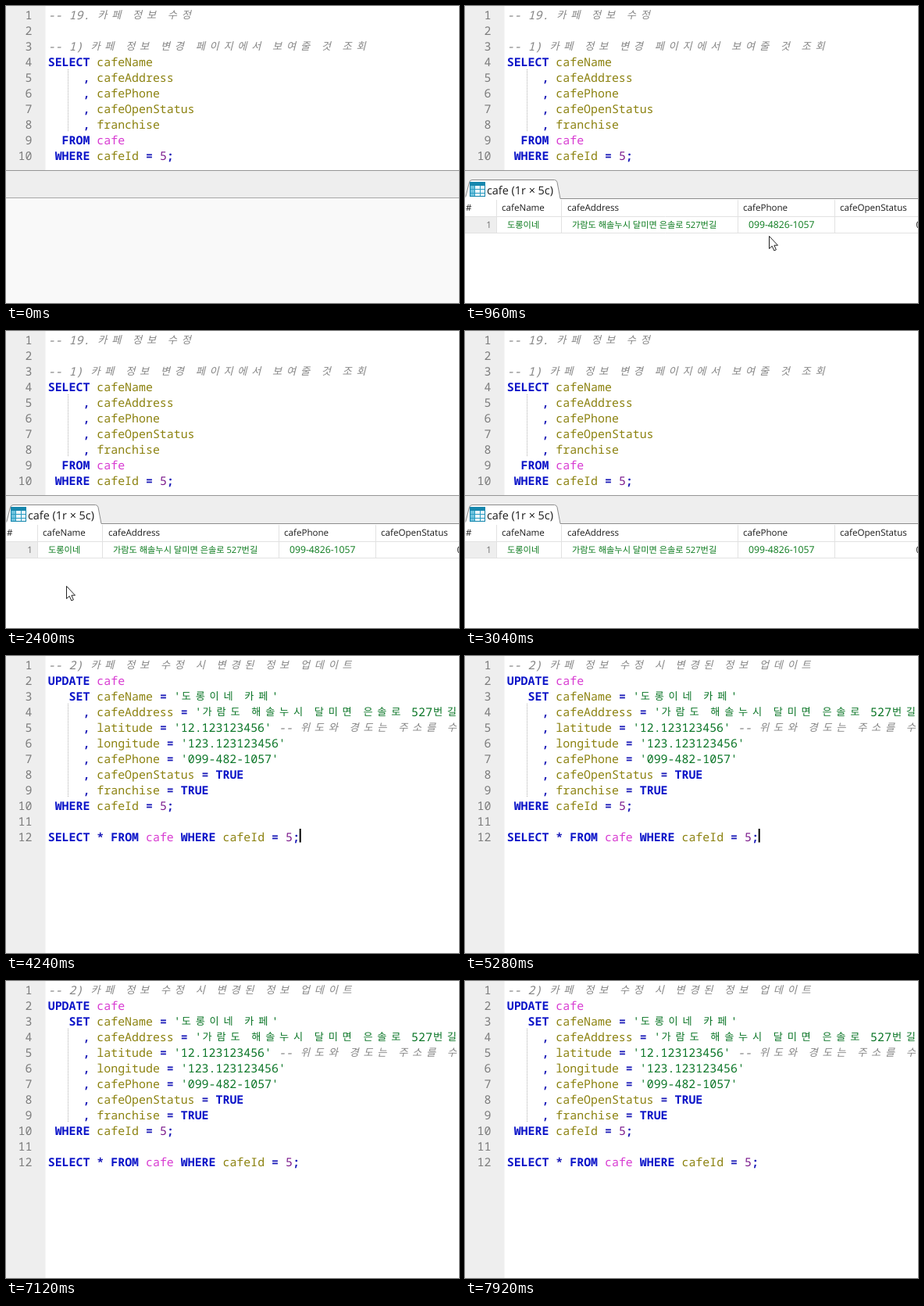
These frames come from a looping animation (580 px wide and 380 px high, 8000 ms). An HTML page:

```html
<!DOCTYPE html>
<html lang="ko">
<head>
<meta charset="utf-8">
<title>SQL editor</title>
<style>
  html, body { margin: 0; width: 100%; height: 100%; overflow: hidden; background: #fff; }
  svg { display: block; width: 580px; height: 380px; text-rendering: geometricPrecision; }

  .code text { font: 14.92px "Noto Sans Mono", "DejaVu Sans Mono", monospace; }
  .code text.ko { font: 300 13.2px "Noto Sans CJK KR", "Noto Sans CJK", sans-serif; }
  .code text.comment { fill: #858585; font-style: italic; }
  .code text.keyword { fill: #0c14c8; font-weight: 700; }
  .code .string { fill: #0a7526; }
  .code .number { fill: #7c1a8c; }
  .code .table { fill: #d83cd2; }
  .code .name { fill: #8c8210; }
  .code text.symbol { fill: #1a1ab8; font-weight: 600; }
  .code .line { fill: #7c7c7c; text-anchor: end; }
  .guide { stroke: #b0b0b0; stroke-dasharray: 1 1; }

  .ui text { font: 11.6px "Open Sans", "Noto Sans CJK KR", "Noto Sans CJK", sans-serif; fill: #1c1c1c; }
  .ui text.tab { font-size: 14.4px; }
  .ui text.cell { fill: #0a7a1c; font-size: 12.2px; }
  .ui text.ko { font-size: 11.2px; }
  .ui text.row { fill: #707070; text-anchor: end; }

  .query, .update, .idle, .result, .caret { animation: 8s step-end infinite; }
  .query { animation-name: query; }
  .update { animation-name: update; }
  .idle { animation-name: idle; }
  .result { animation-name: result; }
  .caret { animation-name: caret; }
  .show { animation: show 8s step-end infinite; }
  .pointer { animation: move 8s ease-in-out infinite; }

  @keyframes query { 0% { opacity: 1 } 49%, 100% { opacity: 0 } }
  @keyframes update { 0% { opacity: 0 } 49%, 100% { opacity: 1 } }
  @keyframes idle { 0% { opacity: 1 } 6%, 100% { opacity: 0 } }
  @keyframes result { 0% { opacity: 0 } 6%, 100% { opacity: 1 } }
  /* 530 ms on, 530 ms off */
  @keyframes caret {
    0%, 56%, 69.25%, 82.5%, 95.75%, 100% { opacity: 0 }
    49.375%, 62.625%, 75.875%, 89.125% { opacity: 1 }
  }
  @keyframes show { 0%, 34.5%, 100% { opacity: 0 } 10% { opacity: 1 } }
  @keyframes move {
    0%, 10% { transform: translate(387px, 273px) }
    12%, 13% { transform: translate(389px, 294px) }
    21.5%, 30.5% { transform: translate(77px, 326px) }
    34.5%, 100% { transform: translate(104px, 246px) }
  }
</style>
</head>
<body>
<svg viewBox="0 0 580 380">
  <rect width="580" height="380" fill="#fff"/>

  <g class="query">
    <rect width="50.5" height="210" fill="#eee"/>
    <path class="guide" d="M79.5 81V160"/>
    <g class="code" id="query"></g>

    <g class="idle">
      <rect y="211" width="580" height="34" fill="#eee"/>
      <rect y="245" width="580" height="1" fill="#a8a8a8"/>
      <rect y="246" width="580" height="134" fill="#f9f9f9"/>
    </g>

    <g class="result ui">
      <rect y="211" width="580" height="35" fill="#eee"/>
      <path d="M0 246.5L1 244.5L6 225.5Q6.5 222.5 9 222.5H114.5Q117 222.5 118 225.5L122 246.5Z" fill="#fff"/>
      <path d="M0 244.5L1 243.5L5.5 225.5Q6.5 222.5 9 222.5H114.5Q117 222.5 118 225.5L122 246.5H580" fill="none" stroke="#8c8c8c"/>
      <rect x="6.5" y="225.5" width="19" height="18" fill="#eaf6fb" stroke="#1787ad"/>
      <rect x="6" y="225" width="20" height="5" fill="#1787ad"/>
      <rect x="7" y="230" width="5" height="13" fill="#6fc3de"/>
      <path d="M12.5 230V243M19.5 230V243M7 234.5H25M7 239.5H25" stroke="#2b9cc2"/>
      <text class="tab" x="28" y="241">cafe (1r × 5c)</text>

      <rect y="270" width="40" height="20" fill="#eee"/>
      <path d="M40.5 248V290M123.5 248V290M349.5 248V290M473.5 248V290" stroke="#e2e2e2"/>
      <path d="M0 269.5H580M0 290.5H580" stroke="#e2e2e2"/>
      <text x="1" y="262">#</text>
      <text x="47" y="262">cafeName</text>
      <text x="131" y="262">cafeAddress</text>
      <text x="356" y="262">cafePhone</text>
      <text x="480" y="262">cafeOpenStatus</text>
      <text class="row" x="34" y="284">1</text>
      <text class="cell ko" x="54" y="283.5">도롱이네</text>
      <text class="cell ko" x="137" y="283.5">가람도 해솔누시 달미면 은솔로 527번길</text>
      <text class="cell" x="363" y="284">099-4826-1057</text>
      <text x="577.5" y="284">0</text>
    </g>
    <rect y="210" width="580" height="1" fill="#959595"/>

    <g class="show">
      <path class="pointer" d="M.5 .5V16.5L4.2 13.2L6.8 19L9.4 17.9L6.9 12.2H11.5Z" fill="#fff" stroke="#222"/>
    </g>
  </g>

  <g class="update">
    <rect width="50.5" height="380" fill="#eee"/>
    <path class="guide" d="M79.5 61V180"/>
    <g class="code" id="update"></g>
    <rect class="caret" x="375.7" y="221" width="2" height="17.5" fill="#000"/>
  </g>
</svg>

<script>
const LEFT = 53.7, CELL = 8.95, ROW = 20, BASE = 16.6;

const scripts = {
  query: `-- 19. 카페 정보 수정

-- 1) 카페 정보 변경 페이지에서 보여줄 것 조회
SELECT cafeName
     , cafeAddress
     , cafePhone
     , cafeOpenStatus
     , franchise
  FROM cafe
 WHERE cafeId = 5;`,
  update: `-- 2) 카페 정보 수정 시 변경된 정보 업데이트
UPDATE cafe
   SET cafeName = '도롱이네 카페'
     , cafeAddress = '가람도 해솔누시 달미면 은솔로 527번길'
     , latitude = '12.123123456' -- 위도와 경도는 주소를 수
     , longitude = '123.123123456'
     , cafePhone = '099-482-1057'
     , cafeOpenStatus = TRUE
     , franchise = TRUE
 WHERE cafeId = 5;

SELECT * FROM cafe WHERE cafeId = 5;`
};

const TOKEN = /(?<comment>--.*)|(?<string>'[^']*')|(?<keyword>\b(?:SELECT|FROM|WHERE|UPDATE|SET|TRUE)\b)|(?<table>\bcafe\b)|(?<name>[a-z]\w*)|(?<number>\d+)|(?<symbol>[^\s\w])/gi;
const isHangul = c => /[가-힣]/.test(c);
const columns = s => [...s].reduce((n, c) => n + (isHangul(c) ? 2 : 1), 0);

function addText(parent, x, y, cls, content) {
  const el = document.createElementNS('http://www.w3.org/2000/svg', 'text');
  el.setAttribute('x', x);
  el.setAttribute('y', y);
  el.setAttribute('class', cls);
  el.textContent = content;
  parent.append(el);
}

function drawLine(parent, line, y) {
  for (const token of line.matchAll(TOKEN)) {
    const kind = Object.keys(token.groups).find(k => token.groups[k]);
    // Hangul takes two columns per letter
    for (const run of token[0].matchAll(/[가-힣]|[^가-힣\s]+/g)) {
      const x = LEFT + CELL * columns(line.slice(0, token.index + run.index));
      const ko = isHangul(run[0]);
      addText(parent, ko ? x + 1 : x, ko ? y - .5 : y, ko ? kind + ' ko' : kind, run[0]);
    }
  }
}

for (const id in scripts) {
  const parent = document.getElementById(id);
  scripts[id].split('\n').forEach((line, i) => {
    const y = BASE + i * ROW;
    addText(parent, 33.5, y, 'line', i + 1);
    drawLine(parent, line, y);
  });
}
</script>
</body>
</html>
```
